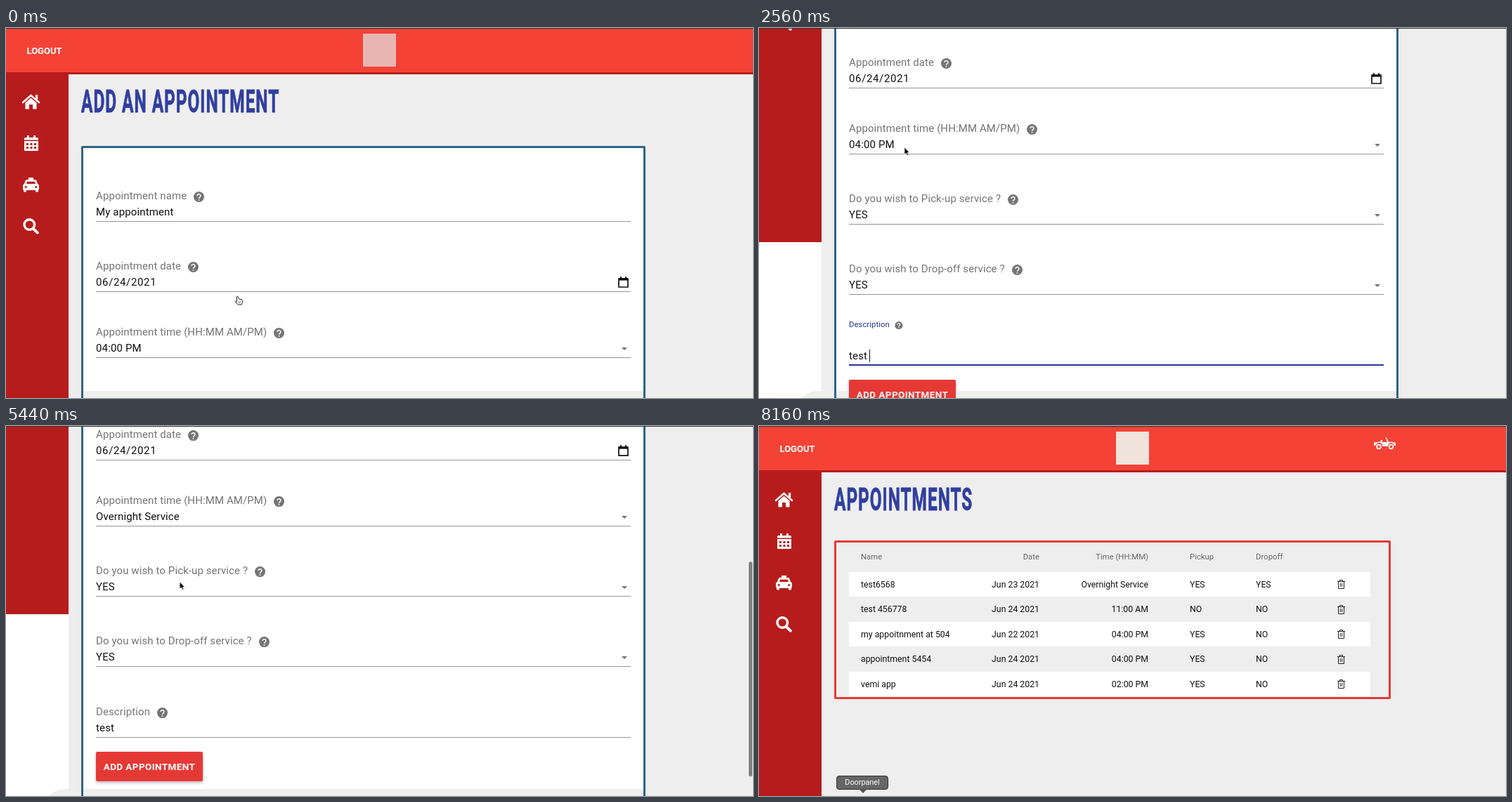
An HTML page for the animation above (8.24 s loop, 1063 px wide and 527 px high).

```html
<!DOCTYPE html>
<html lang="en">
<head>
<meta charset="utf-8">
<title>Appointments</title>
<style>
@property --y { syntax: "<number>"; inherits: true; initial-value: 0; }
html, body { margin: 0; width: 100%; height: 100%; overflow: hidden; background: #fff; }
#stage { position: absolute; inset: 0; overflow: hidden; font: 15px/20px Roboto, "Liberation Sans", sans-serif; color: #111; }
#stage div, #stage svg, #stage i { position: absolute; box-sizing: border-box; white-space: nowrap; }
#stage .anim, #form, #list { animation: 8.24s linear infinite; }
.step { animation-timing-function: step-end !important; }

/* Shared page chrome */
.header { left: 0; top: 0; width: 1063px; height: 66px; background: #f44336; border-bottom: 3px solid #b71c1c; }
.side { left: 0; top: 63px; width: 89px; background: #b71c1c; }
.icons { left: 0; top: 0; width: 89px; height: 300px; fill: #fff; }
.logout { left: 29.5px; top: 22.5px; font-size: 13px; font-weight: 600; color: #fff; }
.logo { left: 508px; top: 8px; width: 47px; height: 47px; background: #e8b5b3; }
.title { left: 107px; top: 76px; font: 700 43.6px/60px Roboto, sans-serif; letter-spacing: 1.7px; color: #303f9f;
  -webkit-text-stroke: .8px #303f9f; transform: scaleX(.56); transform-origin: 0 0; }

/* Form view */
#form, #list { inset: 0; }
#form { background: #fff; animation-name: scroll; }
#form .page { left: 0; top: 0; width: 1063px; height: 935px; transform: translateY(calc(var(--y) * -1px)); }
.ground { left: 89px; top: 0; right: 0; bottom: 0; background: #eee; }
.card { left: 107px; top: 168px; width: 803px; height: 694px; background: #fff; border: 3px solid #2f6488; border-radius: 2px; animation-name: card !important; }
.label { left: 128px; margin-top: -10px; display: flex; align-items: center; color: #757575; letter-spacing: .1px; transform-origin: 0 50%; }
#stage .label svg { position: relative; top: 1px; margin-left: 10px; width: 15px; height: 15px; }
.value { left: 128px; margin-top: -10px; letter-spacing: .14px; }
.value.date { letter-spacing: .64px; }
.line { left: 128px; width: 761px; height: 1px; background: #949494; }
.arrow { left: 876px; border: solid transparent; border-width: 4px 4px 0; border-top-color: #757575; }
.picker { left: 871px; top: 354px; width: 15px; height: 16px; }
.desc { animation-name: blur !important; }
.focus { left: 128px; top: 769px; width: 761px; height: 2px; background: #283593; animation-name: unfocus !important; }
.caret { left: 157px; top: 748px; width: 1px; height: 18px; background: #111; animation-name: caret !important; }
.before { animation-name: before !important; }
.after { animation-name: after !important; }
.button { left: 128px; top: 791px; width: 152px; height: 42px; border-radius: 2px; background: #e53935; color: #fff; text-align: center;
  font: 600 13.5px/42px Roboto, sans-serif; letter-spacing: .03em; box-shadow: 0 2px 4px rgba(0,0,0,.3); animation-name: button !important; }
.message { left: 128px; top: 841px; font-size: 13.1px; line-height: 19.4px; font-weight: 500; color: #008000; animation-name: message !important; }
.shelf { left: 55px; top: 517px; width: 953px; height: 30px; border-radius: 28px 28px 0 0; background: #eee; mix-blend-mode: darken; }
.thumb { left: 1057px; top: 1px; width: 5px; height: 306px; border-radius: 3px; background: #7f7f7f;
  transform: translateY(calc(var(--y) * .588px)); animation-name: thumb !important; }
.menu { left: 128px; top: 12px; width: 762px; height: 403px; background: #fff; border-radius: 3px; opacity: 0; transform-origin: 50% 77%;
  box-shadow: 0 5px 5px -3px rgba(0,0,0,.2), 0 8px 10px 1px rgba(0,0,0,.14), 0 3px 14px 2px rgba(0,0,0,.12); animation-name: menu !important; }
.menu div { left: 0; width: 762px; height: 35.5px; padding-left: 12px; line-height: 35.5px; letter-spacing: .1px; }
.menu .picked { background: #dcdcdc; }
.menu .hover { top: 6px; background: #eee; animation-name: hover !important; }

/* List view */
#list { background: #eee; animation-name: list; }
#list .logo { background: #efe3dc; animation-name: logo !important; }
.jeep { left: 0; top: 15px; width: 33px; height: 20px; animation-name: jeep !important; }
.box { left: 107px; top: 163px; width: 792px; height: 48px; border: 3px solid #e53935; border-radius: 2px; }
.full .box { height: 226px; }
.empty { animation-name: empty !important; }
.full { animation-name: full !important; }
.cell { margin-top: -10px; font-size: 12.3px; }
.head .cell { font-size: 11.3px; color: #666; letter-spacing: .02px; }
.right { transform: translateX(-100%); }
.band { left: 128px; width: 742px; height: 35px; background: #fff; }
.bin { left: 823px; width: 11px; height: 13px; fill: none; stroke: #222; }

/* Overlays */
.edge { left: 0; top: 0; right: 0; height: 1px; background: #333; }
.tip { left: 13px; top: 122px; width: 53px; height: 14px; border-radius: 2px; background: #774555; color: #fff; text-align: center; font-size: 7px; line-height: 14px; font-weight: 500; animation-name: tip !important; }
.status { left: 0; top: 515px; width: 354px; height: 13px; padding-left: 4px; border-radius: 0 4px 0 0; background: #3a3b3d; color: #fff; font-size: 9.4px; line-height: 15px; animation-name: status !important; }
.dock { left: 110px; top: 498px; width: 74px; height: 20px; border: 1px solid #333; border-radius: 4px; background: #666; color: #fff; text-align: center; font-size: 10.8px; line-height: 18px; animation-name: dock !important; }
.dock i { left: 31px; top: 18px; border: solid transparent; border-width: 6px 6px 0; border-top-color: #555; }
.cursor { left: 0; top: 0; animation-name: move !important; }
.cursor svg { left: -6px; top: -2px; width: 20px; height: 20px; overflow: visible; }
.hand { animation-name: hand !important; }
.pointer { animation-name: pointer !important; }

@keyframes scroll {
  0%, .5% { --y: 0; visibility: visible; animation-timing-function: ease-in-out; }
  12.14%, 18.2% { --y: 370; animation-timing-function: ease-in-out; }
  23.67%, 63.71% { --y: 290; animation-timing-function: ease-in-out; }
  68.57%, 71.59% { --y: 370; }
  71.6%, 76.7% { --y: 379; animation-timing-function: ease-in-out; }
  80.6% { --y: 0; }
  83.97% { --y: 0; visibility: visible; }
  83.98%, 100% { --y: 0; visibility: hidden; }
}
@keyframes thumb { 0%, .5% { opacity: 0; } 1%, 26% { opacity: 1; } 29%, 63.6% { opacity: 0; } 64%, 71% { opacity: 1; } 73%, 76.7% { opacity: 0; } 77.2%, 83.9% { opacity: 1; } 84%, 100% { opacity: 0; } }
@keyframes card { 0% { height: 694px; } 71.6%, 100% { height: 732px; } }
@keyframes blur { 0%, 33.3% { transform: translateY(-21.5px) scale(.75); color: #283593; } 35.7%, 100% { transform: none; color: #757575; } }
@keyframes unfocus { 0%, 33.3% { opacity: 1; } 35.7%, 100% { opacity: 0; } }
@keyframes caret { 0%, 12%, 24%, 33.3%, 100% { opacity: 0; } 6%, 18%, 30% { opacity: 1; } }
@keyframes before { 0% { opacity: 1; } 61.5%, 100% { opacity: 0; } }
@keyframes after { 0% { opacity: 0; } 61.5%, 100% { opacity: 1; } }
@keyframes button { 0%, 69.5% { background: #e53935; } 71.5%, 77.5% { background: #303f9f; } 79.5%, 100% { background: #e53935; } }
@keyframes message { 0% { opacity: 0; } 71.6%, 100% { opacity: 1; } }
@keyframes menu { 0%, 33.5% { opacity: 0; transform: scale(.75, .56); } 36.2%, 61.3% { opacity: 1; transform: none; } 63%, 100% { opacity: 0; transform: none; } }
@keyframes hover { 0% { top: 148px; opacity: 0; } 43% { top: 148px; opacity: 1; } 45% { top: 112.5px; } 48% { top: 77px; } 50.5% { top: 41.5px; } 52.5%, 100% { top: 6px; opacity: 1; } }
@keyframes list { 0% { visibility: hidden; background: #fff; } 83.97% { visibility: hidden; background: #fff; } 83.98% { visibility: visible; background: #fff; } 86.9%, 100% { visibility: visible; background: #eee; } }
@keyframes logo { 0%, 86.5% { opacity: 0; } 97.5%, 100% { opacity: 1; } }
@keyframes jeep { 0%, 83.98% { transform: translateX(-38px); } 100% { transform: translateX(932px); } }
@keyframes empty { 0% { opacity: 1; } 89.8%, 100% { opacity: 0; } }
@keyframes full { 0% { opacity: 0; } 89.8%, 100% { opacity: 1; } }
@keyframes tip { 0%, 82.5% { opacity: 0; } 83.5%, 86% { opacity: 1; } 87.5%, 100% { opacity: 0; } }
@keyframes status { 0%, 82.5% { opacity: 0; } 83.5%, 87% { opacity: 1; } 89%, 100% { opacity: 0; } }
@keyframes dock { 0% { opacity: 0; } 92.5%, 100% { opacity: 1; } }
@keyframes move {
  0%, 23.7% { transform: translate(330px, 382px); animation-timing-function: ease-in-out; }
  29.8%, 43% { transform: translate(207px, 170px); animation-timing-function: ease-in-out; }
  55%, 62.5% { transform: translate(285px, 51px); animation-timing-function: ease-in-out; }
  70%, 79% { transform: translate(201px, 431px); animation-timing-function: ease-in-out; }
  83%, 84% { transform: translate(36px, 163px); }
  85.44% { transform: translate(134px, 133px); }
  92%, 100% { transform: translate(147px, 540px); }
}
@keyframes hand { 0%, 32%, 69.5%, 83% { opacity: 1; } 1.9%, 62%, 79%, 84.6%, 100% { opacity: 0; } }
@keyframes pointer { 0%, 32%, 69.5%, 83% { opacity: 0; } 1.9%, 62%, 79%, 84.6%, 100% { opacity: 1; } }
</style>
</head>
<body>
<div id="stage"></div>
<script>
const chrome = (title, sideHeight, extra = '') => `
  <div class="header"></div>
  <div class="side" style="height:${sideHeight}px"></div>
  <svg class="icons" viewBox="0 0 89 300">
    <path d="M24 106 35.5 96 47 106" fill="none" stroke="#fff" stroke-width="2.6" stroke-linecap="round"/>
    <path d="M42 95h3.2v7H42zM27.5 106.5 35.5 99.8l8 6.7V115.5h-5.4V109h-5.2v6.5h-5.4z"/>
    <path d="M26 159.5v-2q0-1.5 1.5-1.5H30v-3h3v3h6v-3h3v3h2.5q1.5 0 1.5 1.5v2zM26 161h20v12.5q0 1.5-1.5 1.5h-17q-1.5 0-1.5-1.5z"/>
    <path d="M29 165.5h14M29 170.5h14" fill="none" stroke="#b71c1c" stroke-width="2.8" stroke-dasharray="3 2.5"/>
    <path d="M32 213h7v3h2q2 0 2.6 2l1.4 4q2 .6 2 3v4q0 1-1 1.5v2q0 1-1 1h-2q-1 0-1-1v-1.5H29v1.5q0 1-1 1h-2q-1 0-1-1v-2q-1-.5-1-1.5v-4q0-2.4 2-3l1.4-4q.6-2 2.6-2h2z"/>
    <path d="M29 222l1.2-3.2h10.6L42 222z" fill="#b71c1c"/>
    <g fill="#b71c1c"><circle cx="28.3" cy="226.5" r="1.6"/><circle cx="42.7" cy="226.5" r="1.6"/></g>
    <g fill="none" stroke="#fff" stroke-linecap="round"><circle cx="33.3" cy="280" r="7.3" stroke-width="3.4"/><path d="M39 286l5.8 5.6" stroke-width="4"/></g>
  </svg>
  <div class="logout">LOGOUT</div>
  <div class="logo anim"></div>${extra}
  <div class="title">${title}</div>`;

const help = `<svg viewBox="0 0 16 16"><circle cx="8" cy="8" r="8" fill="#757575"/>
  <path d="M5.4 6.3a2.6 2.4 0 1 1 4 2q-1.4.9-1.4 2.2" fill="none" stroke="#fff" stroke-width="1.6"/>
  <circle cx="8" cy="12.7" r="1" fill="#fff"/></svg>`;

const field = (name, y, value, kind = '') => `
  <div class="label ${kind === 'desc' ? 'desc anim' : ''}" style="top:${y}px">${name}${help}</div>
  <div class="value ${kind}" style="top:${y + 23}px">${value}</div>
  <div class="line" style="top:${y + 36}px"></div>
  ${kind === 'select' ? `<i class="arrow" style="top:${y + 22}px"></i>` : ''}`;

const hours = ['Overnight Service', '09:00 AM', '10:00 AM', '11:00 AM', '12:00 PM', '01:00 PM',
  '02:00 PM', '03:00 PM', '04:00 PM', '05:00 PM', '06:00 PM'];
const option = (text, i) => `<div class="${text === '04:00 PM' ? 'picked' : ''}" style="top:${6 + i * 35.5}px">${text}</div>`;

const timeValue = '<div class="before anim step">04:00 PM</div><div class="after anim step">Overnight Service</div>&nbsp;';

const form = `<div id="form">
  <div class="ground"></div>
  <div class="page">
    ${chrome('ADD AN APPOINTMENT', 532)}
    <div class="card anim step"></div>
    ${field('Appointment name', 239, 'My appointment')}
    ${field('Appointment date', 339, '06/24/2021', 'date')}
    <svg class="picker" viewBox="0 0 15 16"><path d="M1 3h13v12H1zM4 0v3M11 0v3" fill="none" stroke="#111" stroke-width="1.7"/><path d="M1 2.5h13v3H1z"/></svg>
    ${field('Appointment time (HH:MM AM/PM)', 433, timeValue, 'select')}
    ${field('Do you wish to Pick-up service ?', 533, 'YES', 'select')}
    ${field('Do you wish to Drop-off service ?', 633, 'YES', 'select')}
    <div class="description">${field('Description', 734, 'test').replace('class="label ', 'class="label desc anim')}</div>
    <div class="focus anim"></div>
    <div class="caret anim step"></div>
    <div class="button anim">ADD APPOINTMENT</div>
    <div class="message anim step">Your appointment is schedules on 2021-06-24 at 2021-06-24. If you have availed Overnight Service, your car will be picked-up at<br>10:00 PM and drop off by next morning 07:00 AM on selected date.</div>
  </div>
  <div class="shelf"></div>
  <div class="thumb anim"></div>
  <div class="menu anim"><div class="hover anim step"></div>${hours.map(option).join('')}</div>
</div>`;

const cell = (text, x, y, right) => `<div class="cell ${right ? 'right' : ''}" style="left:${x}px;top:${y}px">${text}</div>`;
const names = ['Name', 'Date', 'Time (HH:MM)', 'Pickup', 'Dropoff'];
const columns = [145, 399, 554, 613, 707];
const emptyColumns = [145, 235, 318, 452, 546];
const cells = (texts, y) => texts.map((t, i) => cell(t, columns[i], y, i === 1 || i === 2)).join('');
const bookings = [
  ['test6568', 'Jun 23 2021', 'Overnight Service', 'YES', 'YES'],
  ['test 456778', 'Jun 24 2021', '11:00 AM', 'NO', 'NO'],
  ['my appoitnment at 504', 'Jun 22 2021', '04:00 PM', 'YES', 'NO'],
  ['appointment 5454', 'Jun 24 2021', '04:00 PM', 'YES', 'NO'],
  ['vemi app', 'Jun 24 2021', '02:00 PM', 'YES', 'NO']
];
const row = (texts, i) => {
  const y = 225.5 + i * 35.5;
  return `${i % 2 ? '' : `<div class="band" style="top:${y - 17.5}px"></div>`}${cells(texts, y)}
    <svg class="bin" style="top:${y - 6.5}px" viewBox="0 0 11 13"><path d="M0 2.5h11M3.5 2.5v-2h4v2M1.5 2.5v10h8v-10M4.3 5v5M6.7 5v5"/></svg>`;
};

const jeep = `<svg class="jeep anim" viewBox="0 0 33 20">
  <path d="M1 8.5 10 7.500l1-2.500h2l-.5 3H20L17.500 1.500l1-.5L22 7.500l8 .5 2 2v3h-2a4.500 4.500 0 0 0-9 1h-8a4.500 4.500 0 0 0-9-1.500H1z" fill="#fff"/>
  <g fill="none" stroke="#fff" stroke-width="1.800"><circle cx="8" cy="14.500" r="2.800"/><circle cx="25.500" cy="14.500" r="2.800"/></g></svg>`;

const list = `<div id="list">
  ${chrome('APPOINTMENTS', 464, jeep)}
  <div class="empty anim step"><div class="box"></div>
    <div class="head">${names.map((t, i) => cell(t, emptyColumns[i], 187)).join('')}</div></div>
  <div class="full anim step">${bookings.map(row).join('')}<div class="box"></div>
    <div class="head">${cells(names, 187)}</div></div>
</div>`;

const overlays = `
  <div class="tip anim">Appointments</div>
  <div class="status anim">https://obscure-cove-65281.herokuapp.com/appointments</div>
  <div class="dock anim step">Doorpanel<i></i></div>
  <div class="edge"></div>
  <div class="cursor anim">
    <svg class="pointer anim step" viewBox="-6 -2 20 20"><path d="M0 0v10l2.3-2 1.7 3.5 1.5-.7L4 7.5h3z" stroke="#fff" stroke-width=".6"/></svg>
    <svg class="hand anim step" viewBox="-6 -2 20 20"><path d="M-1.5.5q1-1 1.8.2L1.5 4l3.7.7q1.5.4 1.4 2l-.3 3-1 2.3H0l-3.7-4.5q.5-1.3 2.2.1z" fill="#fff" stroke="#222"/><path d="M1.5 7.5v2.5M3.3 7.5v2.5" stroke="#222" stroke-width=".7"/></svg>
  </div>`;

document.getElementById('stage').innerHTML = form + list + overlays;
</script>
</body>
</html>
```
